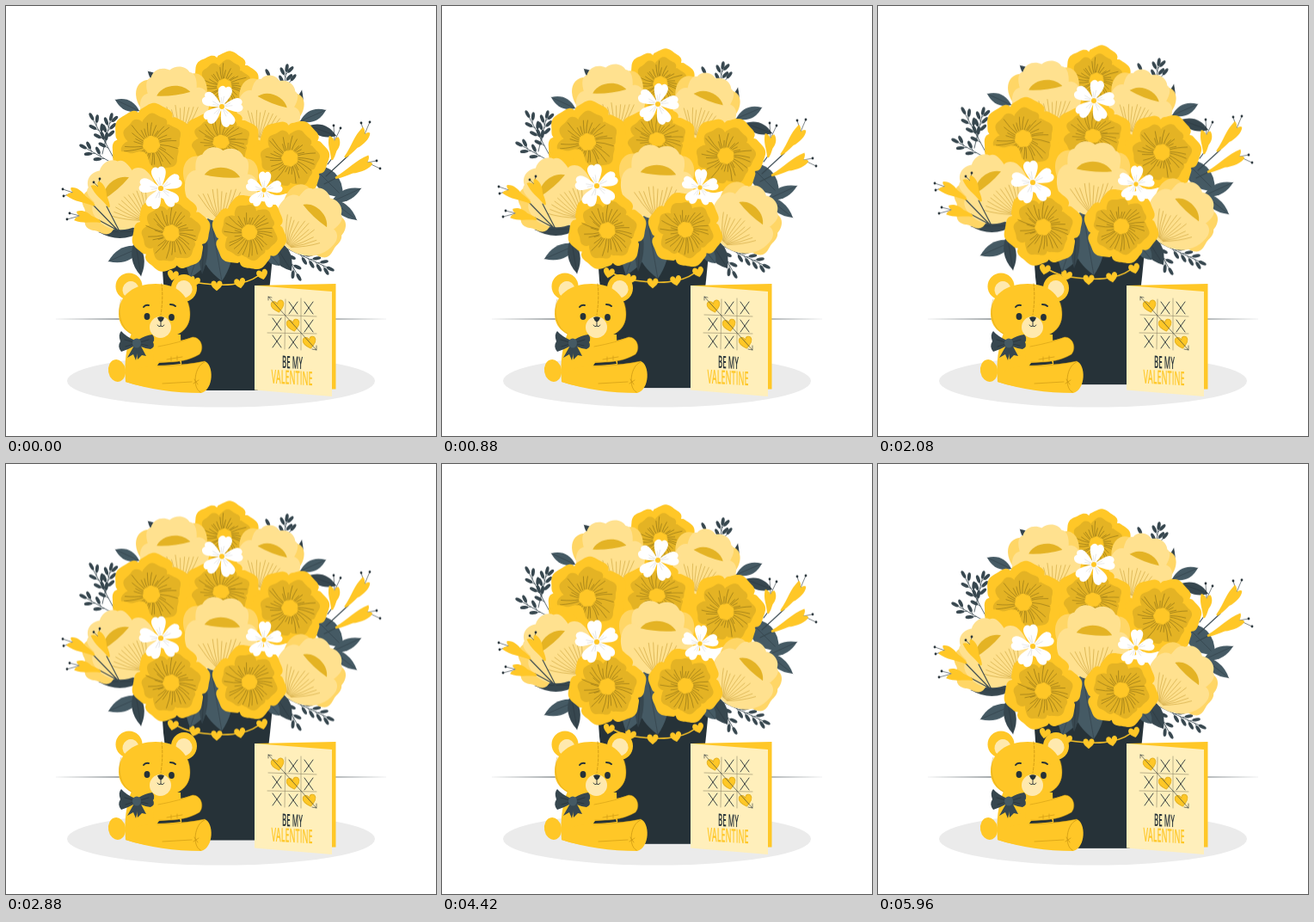
Animation of 500 by 500 pixels, one loop 6000 ms. Source, as an HTML page:

```html
<!DOCTYPE html>
<html lang="en">
<head>
<meta charset="utf-8">
<title>Be my valentine</title>
<style>
html, body { margin: 0; width: 100%; height: 100%; overflow: hidden; background: #fff; }
svg { display: block; width: 100vw; height: 100vh; }
text { font-family: "Open Sans", "Noto Sans", sans-serif; text-anchor: middle; }
</style>
</head>
<body>
<svg viewBox="0 0 500 500" fill="none" stroke-linecap="round" stroke-linejoin="round">
  <ellipse cx="250" cy="436" rx="179" ry="30.5" fill="#ebebeb"/>
  <path d="M53 364Q150 363.2 250 363.2T447 364Q350 364.5 250 364.5T53 364Z" fill="#263238"/>
  <g id="bouquet"></g>
  <g id="bear"></g>
  <g id="card"></g>
</svg>
<script>
const AMBER = '#ffc727', GOLD = '#e4b324', PALE = '#ffe18f', MID = '#ffd666';
const INK = '#263238', SLATE = '#455a64', STEEL = '#37474f', LINE = '#6f5a12';

let seed = 7;
const rnd = () => (seed = seed * 16807 % 2147483647) / 2147483647;
const f = n => n.toFixed(1);
const path = (d, fill, stroke = 'none', w = 1) =>
  `<path d="${d}" fill="${fill}" stroke="${stroke}" stroke-width="${w}"/>`;
const line = (d, color, w = 1) => path(d, 'none', color, w);
const oval = (x, y, rx, ry, fill, turn = 0) =>
  `<ellipse cx="${x}" cy="${y}" rx="${rx}" ry="${ry}" fill="${fill}" transform="rotate(${turn} ${x} ${y})"/>`;
const place = (x, y, turn, scale, body) =>
  `<g transform="translate(${x} ${y}) rotate(${turn}) scale(${scale})">${body}</g>`;

// Closed shape from a radius rule
function polar(radius, fill) {
  let d = '';
  for (let i = 0; i < 120; i++) {
    const a = i * Math.PI / 60, r = radius(a);
    d += (i ? 'L' : 'M') + f(r * Math.cos(a)) + ' ' + f(r * Math.sin(a));
  }
  return path(d + 'Z', fill);
}

function roundFlower(x, y, r, turn, squash = 1) {
  const lobe = (n, a) => Math.abs(Math.sin(n * a / 2)) ** .6;
  let veins = '';
  for (let i = 0; i < 30; i++) {
    const a = (i + rnd() * .6) * Math.PI / 15, b = a + .12;
    const far = r * (.36 + .32 * rnd()), near = r * .22;
    veins += `M${f(near * Math.cos(a))} ${f(near * Math.sin(a))}` +
      `Q${f(far * .6 * Math.cos(a))} ${f(far * .6 * Math.sin(a))} ${f(far * Math.cos(b))} ${f(far * Math.sin(b))}`;
  }
  const body = polar(a => r * (.82 + .17 * lobe(6, a) + .02 * Math.cos(12 * a + 1)), AMBER) +
    polar(a => r * (.6 + .14 * lobe(6, a) + .025 * Math.cos(11 * a)), GOLD) +
    line(veins, LINE, .45) +
    polar(a => r * (.2 + .012 * Math.cos(7 * a)), AMBER);
  return `<g transform="translate(${x} ${y}) scale(1 ${squash}) rotate(${turn})">${body}</g>`;
}

// Cup-shaped flower: side petals, back petal, gold opening, front petal
function poppy(x, y, turn, scale, right = MID) {
  let veins = '';
  for (let i = -5; i <= 5; i++) {
    const top = 12 + Math.abs(i) * 1.2 + rnd() * 8;
    veins += `M${f(2 + i * .8)} 51Q${f(2 + i * 3.6)} 38 ${f(2 + i * 5.4)} ${f(top)}`;
  }
  return place(x, y, turn, scale,
    path('M-38 18C-50 -2 -43 -20 -28 -20Q-18 -20 -10 -8L0 12Z', MID) +
    path('M38 18C48 0 43 -19 30 -20Q18 -20 10 -8L0 12Z', right) +
    path('M-28 6C-32 -12 -30 -21 -23 -22C-18 -33 -6 -33 1 -28C10 -34 22 -30 25 -22C33 -20 33 -8 29 6Z', PALE) +
    path('M-20 3C-14 -11 13 -13 23 3L14 8H-14Z', GOLD) +
    path('M-40 6C-36 -5 -26 -6 -20 1Q2 5 22 2C29 -5 40 -3 43 8C46 24 36 44 22 49C12 56 -5 56 -12 52C-31 47 -46 26 -40 6Z', PALE) +
    line(veins, '#b98d1c', .45));
}

function whiteFlower(x, y, r, turn) {
  let body = '';
  for (let i = 0; i < 5; i++)
    body += `<g transform="rotate(${turn + i * 72})">` +
      path('M-1 0C-3 -6 -9 -14 -8 -20C-6 -25 -2 -25 0 -22.5C3 -26 7 -24 8 -20C9 -14 3 -6 1 0Z', '#fff') +
      line('M0 -4V-12M-1 -4L-3 -10', '#c9c9c9', .4) + '</g>';
  return place(x, y, 0, r / 25, body + oval(0, 0, 3, 3, AMBER));
}

function leaf(x1, y1, x2, y2, w, color = SLATE) {
  const mx = (x1 + x2) / 2, my = (y1 + y2) / 2, len = Math.hypot(x2 - x1, y2 - y1);
  const nx = (y1 - y2) / len * w, ny = (x2 - x1) / len * w;
  return path(`M${x1} ${y1}Q${f(mx + nx)} ${f(my + ny)} ${x2} ${y2}Q${f(mx - nx)} ${f(my - ny)} ${x1} ${y1}Z`, color) +
    line(`M${x1} ${y1}L${x2} ${y2}`, INK, .4);
}

// Thin stem with stalked oval leaves on both sides
function sprig(x1, y1, x2, y2, pairs) {
  const dx = x2 - x1, dy = y2 - y1, a = Math.atan2(dy, dx);
  const blade = (t, b, stalk) => {
    const x = x1 + dx * t, y = y1 + dy * t, c = Math.cos(b), s = Math.sin(b);
    return line(`M${f(x)} ${f(y)}l${f(c * stalk)} ${f(s * stalk)}`, STEEL, .7) +
      oval(f(x + c * (stalk + 3)), f(y + s * (stalk + 3)), 4.8, 2, STEEL, f(b * 180 / Math.PI));
  };
  let out = line(`M${x1} ${y1}L${x2} ${y2}`, STEEL, .8) + blade(1, a, -6);
  for (let i = 0; i < pairs; i++) {
    const t = .3 + .55 * i / pairs;
    out += blade(t, a - .6, 5) + blade(t + .1, a + .6, 5);
  }
  return out;
}

// Trumpet bud from base to mouth, with two dotted stamens
function bud(x1, y1, x2, y2, dots) {
  const len = Math.hypot(x2 - x1, y2 - y1), turn = Math.atan2(y2 - y1, x2 - x1) * 180 / Math.PI;
  const stamens = dots.map(([x, y]) =>
    line(`M${x2} ${y2}L${x} ${y}`, INK, .6) + oval(x, y, 1.4, 1.4, INK)).join('');
  const end = f(len), mid = f(len * .5), neck = f(len * .7), tip = f(len + 5);
  return stamens + place(x1, y1, turn, 1,
    path(`M0 -1C${mid} -3 ${neck} -8 ${tip} -7Q${tip} -3 ${end} 0Q${tip} 1 ${tip} 4C${end} 8 ${neck} 7 ${mid} 4Q4 3 0 1Z`, AMBER));
}

const heart = (x, y, turn, size, fill, stroke) => place(x, y, turn, size,
  path('M0 6C-4 3 -7 0 -6 -3C-5 -6 -1 -6 0 -2C1 -6 5 -6 6 -3C7 0 4 3 0 6Z', fill, stroke, .8));

document.getElementById('bouquet').innerHTML = [
  sprig(128, 182, 98, 126, 3), sprig(112, 172, 123, 126, 3), sprig(126, 184, 87, 162, 2),
  sprig(322, 102, 327, 69, 2), sprig(314, 98, 303, 75, 0), sprig(324, 96, 336, 81, 0),
  sprig(318, 278, 380, 307, 4), sprig(318, 276, 342, 318, 2),
  leaf(155, 122, 127, 109, 12), leaf(180, 90, 165, 76, 8, STEEL),
  leaf(338, 130, 344, 98, 8, STEEL), leaf(342, 134, 372, 121, 13), leaf(352, 139, 384, 151, 13, STEEL),
  leaf(355, 185, 392, 222, 26), leaf(378, 228, 413, 212, 13), leaf(376, 224, 408, 249, 13),
  leaf(158, 262, 108, 263, 15, STEEL), leaf(158, 280, 119, 297, 16), leaf(150, 272, 157, 314, 14, STEEL),
  path('M181 292H310L307 322L293 447H198L183 322Z', INK),
  line('M190 309Q207 319 218 321T245 324T272 322Q288 320 300 308', AMBER, 1.6),
  heart(194, 313, 12, 1.05, AMBER, 'none'), heart(219, 320, 18, 1.05, AMBER, 'none'),
  heart(245, 325, 0, 1.05, AMBER, 'none'), heart(272, 322, -10, 1.05, AMBER, 'none'),
  heart(298, 312, -14, 1.05, AMBER, 'none'),
  leaf(238, 245, 214, 316, 32), leaf(238, 245, 251, 320, 36), leaf(231, 258, 228, 312, 10, STEEL),
  leaf(308, 270, 332, 308, 20, STEEL), leaf(302, 282, 318, 302, 14),
  oval(250, 165, 105, 65, AMBER),
  roundFlower(254, 93, 41, 15),
  poppy(193, 101, -8, .95), poppy(309, 110, 20, .88),
  roundFlower(250, 158, 46, 10, .85),
  roundFlower(169, 161, 48, 8), roundFlower(330, 177, 46, 28),
  place(146, 196, 0, .62, polar(a => 44 + 4 * Math.cos(6 * a), AMBER)),
  place(112, 243, 0, .55, polar(a => 39 + 3 * Math.cos(5 * a), MID)),
  poppy(126, 212, -42, .95, AMBER), poppy(250, 196, 3, 1),
  place(365, 268, 0, .6, polar(a => 39 + 3 * Math.cos(5 * a), MID)),
  poppy(359, 242, 42, .92),
  line('M101 231L133 264M108 249L132 262M117 233L132 262', STEEL, 1.1),
  bud(103, 232, 78, 217, [[66, 213], [67, 221]]),
  bud(110, 251, 86, 244, [[74, 241], [71, 248]]),
  bud(120, 234, 107, 210, [[102, 205], [109, 201]]),
  line('M372 198L398 174M370 207L386 199M374 184L380 176', STEEL, 1.1),
  bud(379, 179, 382, 157, [[381, 139], [389, 142]]),
  bud(394, 176, 417, 149, [[413, 136], [423, 135]]),
  bud(383, 200, 420, 182, [[431, 180], [435, 189]]),
  roundFlower(192, 264, 46, 20), roundFlower(283, 263, 44, 48),
  whiteFlower(251, 117, 25, 12), whiteFlower(180, 212, 26, -8), whiteFlower(300, 214, 22, 4)
].join('');

const SEAM = '#c79411';
document.getElementById('bear').innerHTML = [
  oval(129, 424, 10, 13, AMBER, -10),
  path('M147 378C140 394 137 414 139 437Q170 448 205 442L203 382Z', AMBER),
  path('M178 415Q190 414 202 413L203 416Q190 418 176 418Z', INK),
  path('M170 394C190 393 204 389 217 385C227 385 231 398 225 405C212 413 195 415 172 414Z', AMBER),
  line('M177 396Q204 391 217 385C227 385 231 398 225 405C212 413 195 415 178 414', SEAM, .5),
  path('M139 437C142 418 165 419 185 418Q212 417 231 413C242 417 242 446 227 450Q180 450 139 437Z', AMBER),
  line('M176 419Q210 418 231 413', SEAM, .5),
  line('M231 414C219 418 216 444 226 449M218 439L224 435M219 434L223 440', SEAM, .7),
  line('M187 411L205 408M192 408V413M199 407V412M182 439L216 437', SEAM, .6),
  oval(143, 326, 15.5, 15.5, AMBER), oval(145, 330, 9.5, 10, '#ffe9ae', 15),
  oval(207, 328, 15, 16, AMBER), oval(207, 329, 9.5, 10, '#ffe9ae', -20),
  path('M131 358C131 335 150 323 174 323C199 323 214 337 214 359C214 378 197 387 173 387C149 387 131 378 131 358Z', AMBER),
  line('M134 341C129 356 133 375 146 381M212 345C217 361 212 374 203 380', SEAM, .4),
  `<path d="M181 323Q183 340 180 359" stroke="${SEAM}" stroke-width=".8" stroke-dasharray="3 2"/>`,
  oval(179.5, 373.5, 12.5, 12.5, '#ffe9ae'),
  path('M176 362.5Q180 360 184 362.5Q183 366 180 367.5Q177 366 176 362.5Z', INK),
  line('M180 367V372M176 371Q178 374 180 372Q182 374 184 371', INK, .9),
  oval(164, 361, 3.4, 4, INK), oval(192.5, 362, 3.4, 4, INK),
  line('M160 350Q162 347 166 348M191 347Q195 347 197 349', INK, 1.9),
  path('M150 393L141 409L148 405L151 412L155 394Z', STEEL),
  path('M151 393L153 411L158 406L163 407L155 392Z', STEEL),
  path('M150 389Q139 384 134 378Q130 382 133 390Q129 396 134 402Q143 399 150 395Z', STEEL),
  path('M154 388Q162 383 170 382Q174 386 171 391Q174 396 168 399Q161 398 154 395Z', STEEL),
  line('M149 391L138 388M149 393L139 396M156 391L166 388M156 393L165 395', INK, .7),
  oval(152, 392, 5, 5.5, SLATE)
].join('');

const crosses = [[334, 351], [352, 351], [315, 370], [352, 372], [315, 390], [334, 391]]
  .map(([x, y]) => `M${x - 5} ${y - 7}L${x + 5} ${y + 7}M${x + 5} ${y - 7}L${x - 5} ${y + 7}`).join('');
const lettering = (x, y, size, color, words) =>
  `<g transform="translate(${x} ${y}) skewY(3) scale(.4 1)">` +
  `<text font-size="${size}" font-weight="600" fill="${color}">${words}</text></g>`;

document.getElementById('card').innerHTML = [
  path('M289 325L383.5 323V445.5L289 446Z', AMBER),
  path('M289 325L379 332V454L289 446.5Z', '#ffefbb'),
  line('M325 341L324 399M343 340L343 400M305 359L361 361M304 380L361 381', '#8c8668', .6),
  line(crosses, INK, .9),
  heart(316, 349, -12, 1.2, AMBER, GOLD), heart(334, 371, -10, 1.2, AMBER, GOLD),
  heart(353, 391, -10, 1.2, AMBER, GOLD),
  line('M305 338L361 400M305 342V338L309 339M361 395V400L356 399', INK, .6),
  lettering(333, 421.5, 20, INK, 'BE MY'),
  lettering(332.5, 440, 22.5, AMBER, 'VALENTINE')
].join('');

const rise = y => ({ transform: `translate(0px, ${y}px)` });
document.getElementById('bouquet').animate([rise(0), rise(-9.9), rise(0)], { duration: 6000, iterations: Infinity });
</script>
</body>
</html>
```
